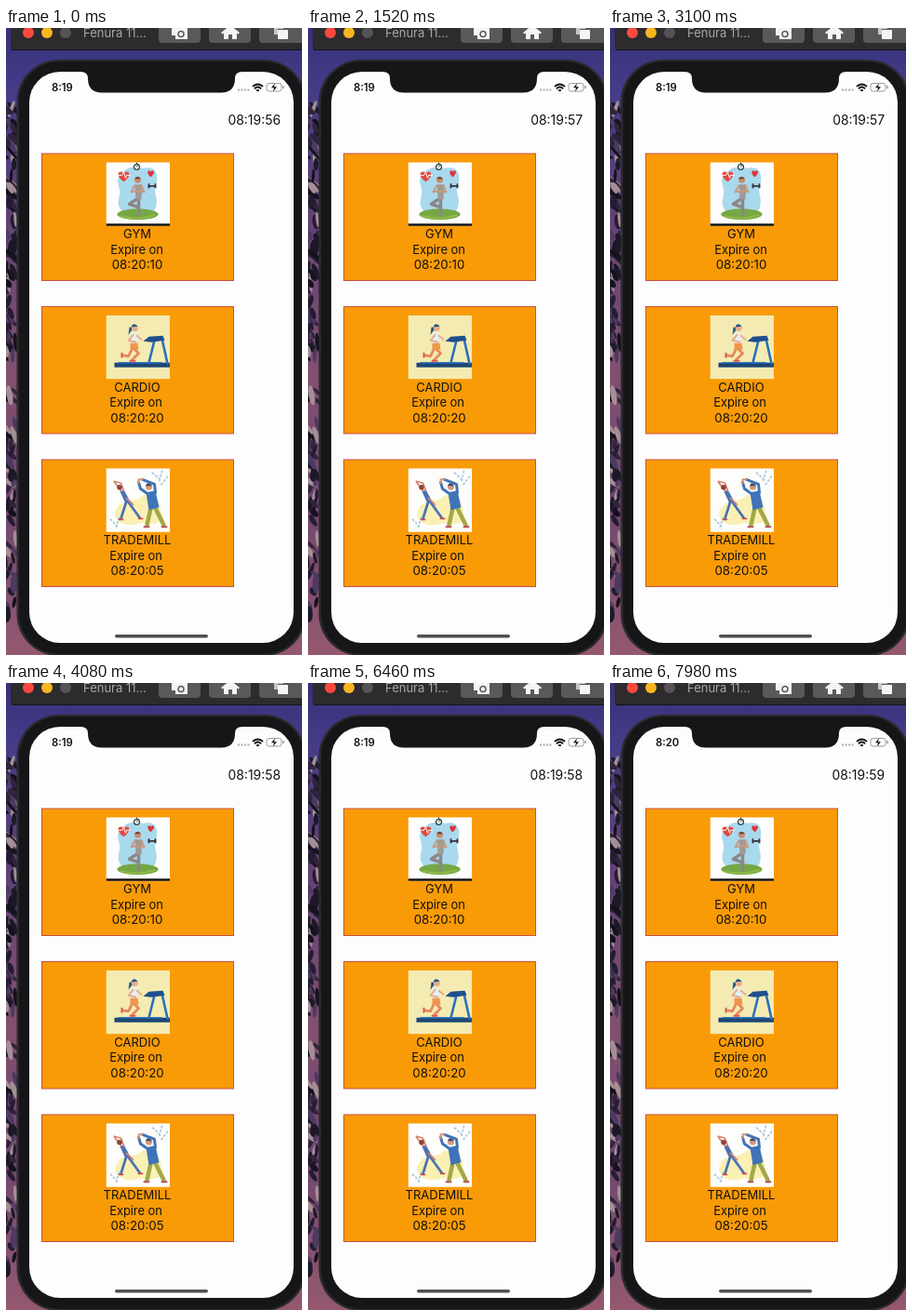
Animation of 318 by 674 pixels, one loop 8 s. Source, as an HTML page:

```html
<!DOCTYPE html>
<html lang="en">
<head>
<meta charset="utf-8">
<title>Workout timers</title>
<style>
  html, body { margin: 0; width: 100%; height: 100%; overflow: hidden; background: #1a1a1c; }
  svg { display: block; width: 100vw; height: 100vh; }
  text { font: 13px Inter, Roboto, sans-serif; fill: #111; }
  .time { font-size: 13.3px; }
  .card text { text-anchor: middle; }
  .line { fill: none; stroke-linecap: round; stroke-linejoin: round; }
</style>
</head>
<body>
<svg viewBox="0 0 318 674" preserveAspectRatio="none">
  <defs>
    <linearGradient id="wall" x2="0" y2="1">
      <stop offset="0" stop-color="#35317a"/>
      <stop offset=".1" stop-color="#453c88"/>
      <stop offset=".25" stop-color="#5a3f78"/>
      <stop offset=".55" stop-color="#83506f"/>
      <stop offset=".75" stop-color="#6f4670"/>
      <stop offset="1" stop-color="#94586f"/>
    </linearGradient>
    <clipPath id="picture"><rect width="68.5" height="68.5"/></clipPath>

    <g id="gym">
      <rect width="69" height="69" fill="#fdfdfd"/>
      <path d="M20 9C28 2 36 8 44 6C55 5 57 17 53 26C51 34 57 40 53 50C48 60 20 60 15 50C10 42 17 35 14 27C11 19 13 13 20 9Z" fill="#a9d9ee"/>
      <ellipse cx="34" cy="56" rx="22" ry="6" fill="#74a843"/>
      <path d="M16 58q18 5 36-1" class="line" stroke="#93b848" stroke-width="2"/>
      <path d="M35 38V57M34 39L25 45L34 48" class="line" stroke="#8b8788" stroke-width="3.500"/>
      <path d="M31 24h8l-1 16h-6Z" fill="#a09a94"/>
      <path d="M31 25L27 32L34 31L41 32L38 25" class="line" stroke="#c89a80" stroke-width="2"/>
      <circle cx="34" cy="19" r="3.500" fill="#c88d70"/>
      <path d="M30.500 18q3-5 7 0Z" fill="#6a4638"/>
      <path d="M19 21C8 13 15 7 19 12C23 7 30 13 19 21Z" fill="#e4483f"/>
      <path d="M13 14h4l2-3l2 6l1-3h4" class="line" stroke="#fff"/>
      <path d="M48 16C42 11 46 7 48 10C51 7 54 11 48 16Z" fill="#dc3540"/>
      <circle cx="33" cy="5" r="3" fill="#eef6f4" stroke="#30463f" stroke-width="1.300"/>
      <path d="M33 0v2M33 5l1-2" stroke="#30463f"/>
      <path d="M45 25.500h9M46 23v5M53 23v5" stroke="#34343a" stroke-width="1.800"/>
      <rect y="66" width="69" height="3" fill="#101012"/>
    </g>

    <g id="cardio">
      <rect width="69" height="69" fill="#f3ebb2"/>
      <path d="M9 51h60v5H9Z" fill="#1c4674"/>
      <path d="M13 51h47" stroke="#2f78c0" stroke-width="1.500"/>
      <path d="M52 27L46 51M60 25L66 52" class="line" stroke="#2a6fbd" stroke-width="2.600"/>
      <path d="M40 28l6-5l15-1l2 5l-14 2Z" fill="#1f4f8c"/>
      <path d="M30 36L35 41L28 48M28 36L24 44L18 43" class="line" stroke="#e5885c" stroke-width="2.800"/>
      <path d="M26 49h5M17 41v4" class="line" stroke="#e2554a" stroke-width="2"/>
      <path d="M26 19h8l-1 12h-7Z" fill="#e4f0f4"/>
      <path d="M26 30h8l1 7h-9Z" fill="#f0964a"/>
      <path d="M29 21L24 27L32 29M33 22L38 26" class="line" stroke="#e8ac90" stroke-width="2"/>
      <circle cx="31" cy="14" r="3.300" fill="#e8ac90"/>
      <path d="M34 12C29 6 26 12 28 16L24 21L25 13Z" fill="#27587f"/>
    </g>

    <g id="stretch">
      <rect width="69" height="69" fill="#fdfdfb"/>
      <path d="M11 44C18 31 28 39 37 31C49 23 60 36 59 47C65 58 52 62 37 59C20 65 5 56 11 44Z" fill="#faf0b4"/>
      <path d="M50 5l8 7M60 3l-3 12M66 9l-7 9M5 55l7 7M14 53l-3 10" class="line" stroke="#aecbe0" stroke-width="1.800" stroke-dasharray="1.500 3"/>
      <path d="M22 35L16 54M23 35L36 53" class="line" stroke="#4a72b4" stroke-width="2.800"/>
      <path d="M15 25l4-2l6 11l-5 2Z" fill="#4a72b4"/>
      <path d="M16 24L9 15M19 24L16 16L9 14M22 32L29 39" class="line" stroke="#d98370" stroke-width="1.700"/>
      <circle cx="14.500" cy="20.500" r="2.800" fill="#8c4638"/>
      <path d="M14 55h4M35 54h4" class="line" stroke="#c64a48" stroke-width="1.800"/>
      <path d="M48 43L44 61M53 43L62 61" class="line" stroke="#a2a845" stroke-width="4.500"/>
      <path d="M43 26l10-2l4 18l-11 3Z" fill="#3f74b8"/>
      <path d="M44 27L37 22L35 15M53 26L52 17L39 12" class="line" stroke="#3f74b8" stroke-width="3"/>
      <path d="M35 16L35 12h4" class="line" stroke="#d49a7c" stroke-width="2"/>
      <circle cx="46" cy="20" r="3.500" fill="#d49a7c"/>
      <path d="M42.500 19q2-6 7 0Z" fill="#384a70"/>
      <path d="M41 63h5M60 63h5" class="line" stroke="#b84f58" stroke-width="2"/>
    </g>
  </defs>

  <rect width="318" height="674" fill="url(#wall)"/>
  <g id="leaves"></g>

  <!-- Window toolbar -->
  <path d="M5 0H318V24H9Q5 24 5 20Z" fill="#2d2b2e"/>
  <path d="M6 23.500H318" stroke="#151416"/>
  <circle cx="24" cy="5" r="6" fill="#fb493e"/>
  <circle cx="44" cy="5" r="6" fill="#f9b620"/>
  <circle cx="64" cy="5" r="6" fill="#555356"/>
  <text x="83" y="10" style="fill:#a9a7aa">Fenura 11...</text>
  <g fill="#5a585b">
    <rect x="164" y="-8" width="45" height="24" rx="4"/>
    <rect x="218" y="-8" width="45" height="24" rx="4"/>
    <rect x="272" y="-8" width="52" height="24" rx="4"/>
  </g>
  <path d="M178 0h4l2-2h6l2 2h3v12h-13v-4h-4Z" fill="#f4f4f4"/>
  <circle cx="188" cy="6.500" r="3" fill="none" stroke="#5a585b" stroke-width="1.500"/>
  <path d="M231 5l10-8l10 8l-1.500 1.500l-1.500-1v6.500h-5V7h-4v5h-5V5.500l-1.500 1Z" fill="#f4f4f4"/>
  <path d="M288-3h10v4h-6v6h-4Z" fill="#c8c6c8"/>
  <rect x="292" y="2" width="11" height="10" rx="1" fill="#f4f4f4"/>

  <!-- Phone -->
  <rect x="11.500" y="34" width="311" height="641" rx="45" fill="#2a2a2c"/>
  <rect x="14" y="36" width="306" height="637" rx="43" fill="#161618"/>
  <rect x="25" y="47" width="284" height="614" rx="33" fill="#fdfdfd"/>
  <path d="M80 46.500V47Q88 47 88 54Q88 69.500 103 69.500H231Q246 69.500 246 54Q246 47 254 47V46.500Z" fill="#161618"/>
  <text id="status" x="49" y="68" style="font-size:11.3px;font-weight:600"></text>
  <path d="M249 66.500h13" stroke="#ababab" stroke-width="2" stroke-dasharray="2 1.500"/>
  <g class="line" stroke="#111" stroke-width="1.800">
    <path d="M265.500 62.500q5-4 10 0M267.500 64.800q3-2.500 6 0"/>
    <path d="M269.800 67h1.400"/>
  </g>
  <rect x="280" y="59.500" width="16" height="8.500" rx="2.500" fill="#fdfdfd" stroke="#9a9a9a"/>
  <path d="M298 62v3" stroke="#9a9a9a" stroke-width="1.500"/>
  <path d="M289 59.500l-4 4.800h3l-1 4l4-5h-3Z" fill="#111"/>
  <text id="clock" x="295" y="104" text-anchor="end" style="font-size:13.9px"></text>
  <g id="cards"></g>
  <rect x="117" y="652" width="100" height="3.500" rx="1.750" fill="#505052"/>
</svg>
<script>
const byId = id => document.getElementById(id);

const cards = [
  { y: 135, name: 'GYM', art: 'gym', expires: '08:20:10', labelX: 140.5 },
  { y: 299.5, name: 'CARDIO', art: 'cardio', expires: '08:20:20', labelX: 139.5 },
  { y: 464, name: 'TRADEMILL', art: 'stretch', expires: '08:20:05', labelX: 139.5 }
];
byId('cards').innerHTML = cards.map(({ y, name, art, expires, labelX }) => `
  <g class="card" transform="translate(0 ${y})">
    <rect x="38.5" width="206" height="136.5" fill="#f99b07" stroke="#c8504a"/>
    <g transform="translate(107.5 9.3)" clip-path="url(#picture)"><use href="#${art}"/></g>
    <text x="141" y="91">${name}</text>
    <text x="${labelX}" y="107.5" letter-spacing="-.1">Expire on</text>
    <text class="time" x="141" y="124">${expires}</text>
  </g>`).join('');

// Foliage in the strip of wallpaper beside the phone
let seed = 11;
const random = () => (seed = seed * 16807 % 2147483647) / 2147483647;
const leafColors = ['#15121c', '#241c30', '#a58f94', '#4c3a62', '#30243c', '#1c1826'];
byId('leaves').innerHTML = Array.from({ length: 120 }, (_, i) => {
  const x = random() * 14 - 3, y = 85 + random() ** 1.3 * 550;
  const angle = random() * 80 - 60;
  return `<ellipse rx="${1.5 + random() * 2}" ry="${5 + random() * 6}" fill="${leafColors[i % 6]}"
    transform="translate(${x} ${y}) rotate(${angle})"/>`;
}).join('');

const LOOP = 8000;
const ticks = [1000, 3840, 6680];
const minuteChange = 7540;

function draw(now) {
  const t = now % LOOP;
  byId('clock').textContent = '08:19:' + (56 + ticks.filter(tick => t >= tick).length);
  byId('status').textContent = t < minuteChange ? '8:19' : '8:20';
  requestAnimationFrame(draw);
}
draw(performance.now());
</script>
</body>
</html>
```
